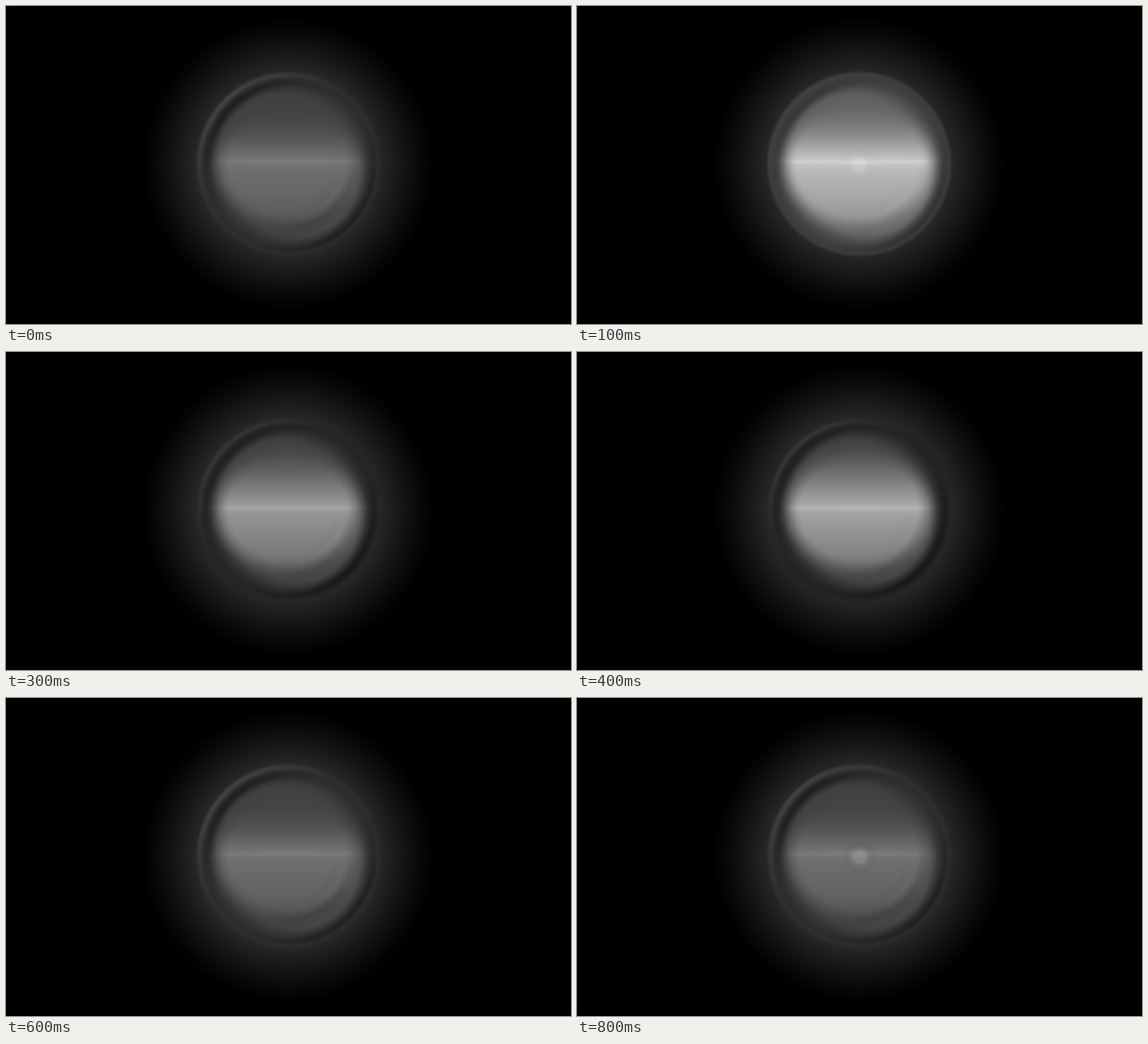
An HTML page with a canvas that plays this animation: 998x561 px, repeating every 0.9 s.

```html
<!DOCTYPE html>
<html lang="en">
<head>
<meta charset="utf-8">
<title>Pulsing orb</title>
<style>
  html, body { margin: 0; width: 100%; height: 100%; overflow: hidden; background: #000; }
  canvas { display: block; }
</style>
</head>
<body>
<canvas id="stage" width="998" height="561"></canvas>
<script>
const W = 998, H = 561;
const STEP = 100, STEPS = 9;
const CX = 498, CY = 278, LINE_Y = 274.5;
const GLOW_R = 260, RIM_R = 162;

const ctx = document.getElementById('stage').getContext('2d');

// plate: disk grey, gap: grey between disk and rim, band: strength and
// height of the light above the horizon, reach: how far it spreads
const dim = { plate: 65, gap: 43, rim: 14, groove: 12, ripple: 1, band: 54, height: 47, reach: 0, dot: 0 };
const mid = { plate: 64, gap: 37, rim: 10, groove: 6, ripple: 1, band: 83, height: 60, reach: 0, dot: 0 };
const high = { plate: 66, gap: 33, rim: 13, groove: 0, ripple: 0.8, band: 112, height: 72, reach: 0, dot: 0 };
const flash = { plate: 94, gap: 60, rim: 2, groove: 5, ripple: 0.7, band: 111, height: 56, reach: 6, dot: 0.5 };
const peak = { plate: 91, gap: 43, rim: 10, groove: 0, ripple: 0.4, band: 130, height: 78, reach: 6, dot: 0 };

const mix = (a, b, k) => a + (b - a) * k;
const blend = (p, q, k) =>
  Object.fromEntries(Object.keys(p).map(key => [key, mix(p[key], q[key], k)]));
const smooth = (a, b, x) => {
  const k = Math.min(1, Math.max(0, (x - a) / (b - a)));
  return k * k * (3 - 2 * k);
};
const bump = (x, at, width) => Math.exp(-(((x - at) / width) ** 2));

const poses = [
  dim, flash, mid, blend(mid, high, 0.5), high, peak, dim,
  { ...dim, dot: 0.5 }, { ...dim, dot: 1 }
];

function glow(r) {
  return r < GLOW_R ? 39 * ((GLOW_R - r) / (GLOW_R - RIM_R)) ** 1.2 : 0;
}

function horizon(dy, r) {
  return 6 * Math.exp(-Math.abs(dy) / 5) * Math.max(0, 1 - r / 230);
}

// Light over the horizon: sharp crest, quick fall above, slow fall below
function band(dy, p) {
  const crest = 0.12 * Math.exp(-Math.abs(dy) / 6);
  const body = dy < 0
    ? Math.exp(-((-dy / p.height) ** 1.6))
    : 1 - dy / 240;
  return p.band * (crest + 0.88 * body);
}

function shade(x, y, p) {
  const dx = x - CX, dy = y - CY;
  const r = Math.hypot(dx, dy);
  if (r > GLOW_R) return 0;
  const up = y - LINE_Y;
  const line = horizon(up, r);
  if (r > RIM_R + 4) return glow(r) + line;

  // Facing: 1 at the upper left, -1 at the lower right
  const facing = r ? -(dx + dy) / (r * Math.SQRT2) : 0;
  const near = Math.max(0, facing) ** 2;
  const far = Math.max(0, -facing) ** 2;
  const side = 1 - facing * facing;
  const flat = r ? (dx / r) ** 2 : 0;

  const soft = 9 + 15 * side;
  const edge = 134 + 6 * far;
  let v = mix(p.plate, p.gap, smooth(edge - soft, edge + soft, r));

  const reach = 1 - smooth(80 + 22 * flat + p.reach, 130 + 15 * flat + p.reach, r);
  v += band(up, p) * reach;

  v += p.rim * (0.2 + 1.4 * near) * bump(r, 157, 6);
  v -= p.groove * near * bump(r, 141, 8);
  v += p.ripple * far * (
    6 * bump(r, 131, 9) - 9 * bump(r, 111, 8)
    - 4 * bump(r, 86, 6) - 12 * bump(r, 152, 6));

  if (p.dot && r < 40) {
    const d = Math.hypot(dx, y - 280);
    v += p.dot * (20 * (1 - smooth(8, 19, d)) - 4 * bump(d, 25, 3));
  }
  return mix(v, glow(r), smooth(RIM_R - 4, RIM_R + 4, r)) + line;
}

function paint(p) {
  const img = ctx.createImageData(W, H);
  const px = new Uint32Array(img.data.buffer);
  px.fill(0xff000000);
  for (let y = CY - GLOW_R; y <= CY + GLOW_R; y++) {
    for (let x = CX - GLOW_R; x <= CX + GLOW_R; x++) {
      const g = Math.max(0, Math.min(255, Math.round(shade(x, y, p))));
      px[y * W + x] = (0xff000000 | g * 0x010101) >>> 0;
    }
  }
  // Faint hairlines on the left and bottom edges
  for (let y = 0; y < H; y++) px[y * W] = 0xff080808;
  px.fill(0xff080808, (H - 1) * W);
  return img;
}

const images = new Map();
for (const p of poses) if (!images.has(p)) images.set(p, paint(p));

let shown = null;
function draw() {
  const pose = poses[Math.floor(performance.now() / STEP) % STEPS];
  if (pose !== shown) ctx.putImageData(images.get(pose), 0, 0);
  shown = pose;
  requestAnimationFrame(draw);
}
draw();
</script>
</body>
</html>
```
